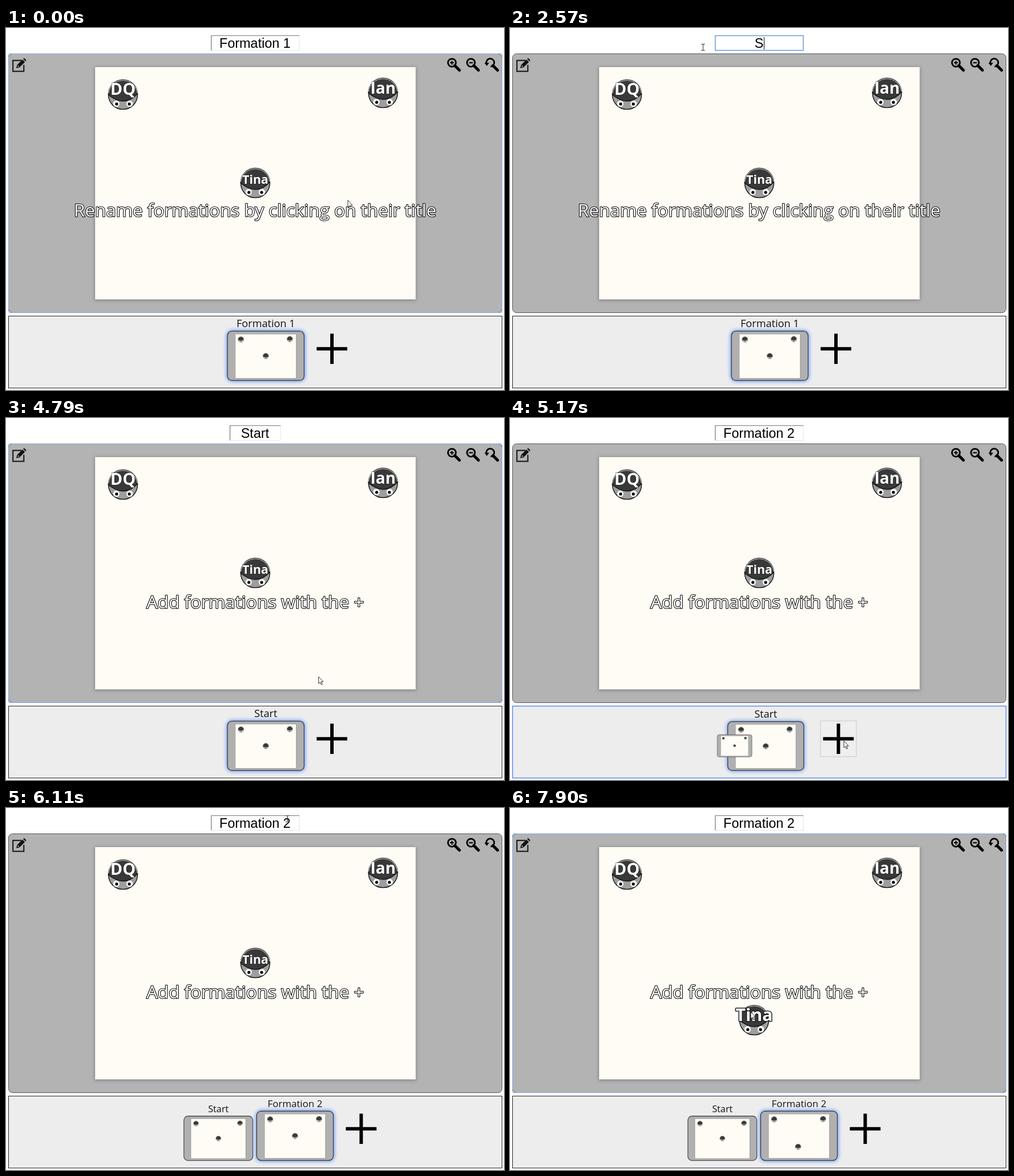
Write an HTML page that moves like this. It is 877x639 px and loops after 8000 ms.

```html
<!DOCTYPE html>
<html lang="en">
<head>
<meta charset="utf-8">
<title>Formations</title>
<style>
  html, body { margin: 0; width: 100%; height: 100%; overflow: hidden; background: #fff; }
  svg { display: block; width: 877px; height: 639px; }
  text { text-anchor: middle; font-family: "Open Sans", "Noto Sans", sans-serif; white-space: pre; }
  #title { font: 23.5px "Liberation Sans", Arial, sans-serif; }
  #caption { font-size: 31.6px; fill: #fff; stroke: #000; stroke-width: 2.1; stroke-linejoin: round; paint-order: stroke; }
  .name { font-weight: 700; fill: #fff; stroke: #222; stroke-linejoin: round; paint-order: stroke; }
  .paper { fill: #fffcf5; }
  .label { fill: #111; }
</style>
</head>
<body>
<svg viewBox="0 0 877 639">
  <defs>
    <filter id="soft" x="-20%" y="-20%" width="140%" height="140%"><feGaussianBlur stdDeviation="3"/></filter>
    <g id="face">
      <circle r="25.6" fill="#9e9e9e" stroke="#1c1c1c" stroke-width="1.5"/>
      <path d="M-25.6 0A25.6 25.6 0 0 1 25.6 -2Q3 23 -25.6 0z" fill="#393939" stroke="#111" stroke-width="1.4"/>
      <path d="M-25.6 -3A25.8 25.8 0 0 1 25.6 -3" fill="none" stroke="#bdbdbd" stroke-width="1.3"/>
      <g fill="#fff"><circle cx="-11.7" cy="15.7" r="5.6"/><circle cx="11.7" cy="15.7" r="5.6"/></g>
      <circle cx="-11.2" cy="16.2" r="2.6"/><circle cx="11.2" cy="16.2" r="2.6"/>
    </g>
    <path id="handle" d="M5 5L13.2 13.2" stroke="#000" stroke-width="5" stroke-linecap="round"/>
  </defs>

  <rect id="field" y="13.5" height="26" fill="#fff"/>
  <path id="bevel" fill="none" stroke="#777" stroke-width="1.2"/>
  <rect id="mark" y="15" height="24" fill="#3390ff"/>
  <text id="title" x="438.5" y="35"></text>
  <path id="caret" stroke="#000"/>

  <rect x="4.5" y="45.5" width="869" height="457" rx="7" fill="#b3b3b3" stroke="#555"/>
  <rect id="ring" x="4.5" y="45.5" width="869" height="457" rx="1" fill="none" stroke="#82aae6"/>
  <rect x="156" y="69" width="566.5" height="412" fill="#707070" opacity=".65" filter="url(#soft)"/>
  <rect class="paper" x="157" y="69" width="564.5" height="410"/>

  <g id="icons">
    <path d="M27 57.2H12.2V76.4H31.4V65" fill="none" stroke="#111" stroke-width="2"/>
    <path d="M18 71l1.7-6L29 55.7l4.3 4.3L24 69.3z M30.2 54.5l1.7-1.6 4 4-1.6 1.8z" fill="#111"/>
    <path d="M20.5 68.5l.8-2.6 1.8 1.8z" fill="#fff"/>
    <g fill="none" stroke="#000">
      <g transform="translate(785.3 61.3)"><use href="#handle"/><circle r="7" stroke-width="2.8"/><path d="M-3.4 0H3.4M0 -3.4V3.4" stroke-width="2"/></g>
      <g transform="translate(818.8 61.3)"><use href="#handle"/><circle r="7" stroke-width="2.8"/><path d="M-3.4 0H3.4" stroke-width="2.2"/></g>
      <g transform="translate(852.5 61.3)"><use href="#handle"/><path d="M-6.6 1A7 7 0 1 1 1 6.8" stroke-width="2.8"/><path d="M-10 0H-1.6L-5.8 5.6z" fill="#000" stroke="none"/></g>
    </g>
  </g>
  <g id="dancers"></g>

  <rect id="panel" x="4.5" y="508.5" width="869" height="127" fill="#ededed"/>
  <g id="plus">
    <rect id="key" x="-31.5" y="-31.5" width="63" height="63" fill="#efefef" stroke="#d5d5d5" stroke-width="1.5"/>
    <path d="M-27 0H27M0 -26.7V26.7" stroke="#000" stroke-width="6"/>
  </g>
  <g id="thumbs"></g>

  <path id="arrow" d="M0 0V12L2.7 9.5 4.6 14 6.5 13.2 4.6 8.8H8.2z" fill="#fff" stroke="#333" stroke-width="1"/>
  <path id="beam" d="M-3 -5.5H-1L0 -5 1 -5.5H3M0 -5V5M-3 5.5H-1L0 5 1 5.5H3" fill="none" stroke="#222" stroke-width="1"/>
  <text id="caption" x="438.8"></text>
</svg>
<script>
const LOOP = 8000, ADD = 5100, GROW = 760, GRAB = 7340, DROP = 7900;
const $ = id => document.getElementById(id);
const set = (el, attrs) => { for (const k in attrs) el.setAttribute(k, attrs[k]); };
const show = (el, on) => set(el, { visibility: on ? "visible" : "hidden" });
const mix = (a, b, p) => a + (b - a) * p;
const clamp = v => Math.min(1, Math.max(0, v));

// Latest entry whose time has come
const at = (list, t) => list.filter(e => e[0] <= t).pop()[1];

const titles = [[0, "Formation 1"], [2570, "S"], [2880, "St"], [2950, "Sta"], [3030, "Star"], [3270, "Start"], [ADD, "Formation 2"]];
const labels = [[0, "Formation 1"], [2730, "S"], [2950, "St"], [3110, "Star"], [3420, "Start"]];
const widths = [[0, 155], [2730, 89], [ADD, 155]];

// Pointer keys: time, x, y
const route = [
  [0, 602, 304], [40, 602, 304], [640, 507, 31], [1860, 507, 31], [2110, 340, 34],
  [3700, 340, 34], [3810, 524, 228], [4340, 524, 228], [4620, 545, 440], [4760, 545, 440],
  [5000, 588, 570], [5200, 588, 570], [5560, 537, 127], [5800, 500, 16], [6420, 491, 22],
  [6840, 491, 22], [7050, 446, 236], [7270, 446, 236], [7280, 434, 253], [GRAB, 434, 253],
  [7750, 424, 360], [LOOP, 424, 360]
];

function pointer(t) {
  const i = route.findIndex(k => k[0] > t);
  const a = route[i - 1], b = route[i];
  const p = (t - a[0]) / (b[0] - a[0]);
  return [mix(a[1], b[1], p), mix(a[2], b[2], p)];
}

// Standard "ease" curve, solved by bisection
function ease(x) {
  const bez = (a, b, u) => 3 * a * u * (1 - u) ** 2 + 3 * b * u * u * (1 - u) + u ** 3;
  let lo = 0, hi = 1;
  for (let i = 0; i < 20; i++) {
    const mid = (lo + hi) / 2;
    if (bez(.25, .25, mid) < x) lo = mid; else hi = mid;
  }
  return bez(.1, 1, lo);
}

const cast = [
  { name: "DQ", x: 206, y: 118, size: 29, base: 0 },
  { name: "Ian", x: 664, y: 115, size: 28, base: .5 },
  { name: "Tina", x: 439, y: 274, size: 21.5, base: .5 }
];
const lead = cast[2];

$("dancers").innerHTML = cast.map(d =>
  `<g transform="translate(${d.x} ${d.y})"><use href="#face"/>
   <text class="name" y="${d.base}" font-size="${d.size}" stroke-width="1">${d.name}</text></g>`).join("");
const leadEl = $("dancers").lastElementChild;
const leadName = leadEl.querySelector("text");

// Thumbnail drawn around its own centre
const mini = d => `translate(${(d.x - 439) * .188} ${(d.y - 274) * .188 + .6}) scale(.188)`;
const thumb = () => `<g><text class="label"></text><g class="card">
  <rect class="glow" x="-69.5" y="-45.5" width="139" height="91" rx="10" fill="#6a9cff" filter="url(#soft)"/>
  <rect x="-67.5" y="-43.5" width="135" height="87" rx="8" fill="#b0b0b0" stroke="#333" stroke-width="1.2"/>
  <rect x="-53.8" y="-38" width="108" height="78" fill="#999"/>
  <rect class="paper" x="-53.3" y="-38" width="106.5" height="77.3"/>
  ${cast.map(d => `<use href="#face" transform="${mini(d)}"/>`).join("")}</g></g>`;
$("thumbs").innerHTML = thumb() + thumb();
const [first, second] = $("thumbs").children;

function place(el, x, y, scale, glow, text, size) {
  set(el.querySelector(".card"), { transform: `translate(${x} ${y}) scale(${scale})` });
  set(el.querySelector(".glow"), { opacity: glow });
  const label = el.querySelector("text");
  label.textContent = text;
  set(label, { x, y: y - 43.5 * scale - 7.3, "font-size": size });
}

function drawTitle(t, mx) {
  const w = at(widths, t), l = 439 - w / 2, r = l + w;
  const focus = t >= 1270 && t < 3740;
  const text = at(titles, t);
  $("title").textContent = text;
  set($("field"), { x: l, width: w, stroke: focus ? "#6f9be3" : "#e6e6e6", "stroke-width": focus ? 1.6 : 1 });
  set($("bevel"), { d: `M${l} 39.5V13.5H${r}` });
  show($("bevel"), !focus);

  const picking = t >= 1660 && t < 2570;
  const from = t < 1880 ? 488 : Math.max(376, Math.min(488, mx));
  set($("mark"), { x: from, width: 501 - from });
  show($("mark"), picking);
  const end = 438.5 + $("title").getComputedTextLength() / 2 + 1;
  set($("caret"), { d: `M${Math.round(end) + .5} 16V38` });
  show($("caret"), focus && !picking);
}

function drawLead(t, mx, my) {
  const moved = t >= GRAB;
  const pos = t >= DROP ? { x: 430, y: 375 } : moved ? { x: mx + 5, y: my + 21 } : lead;
  set(leadEl, { transform: `translate(${pos.x} ${pos.y})` });
  const hover = t >= 7280;
  set(leadName, { "font-size": hover ? 30.5 : lead.size, "stroke-width": hover ? 3 : 1 });
  set(second.querySelector("use:last-child"), { transform: mini(t >= DROP ? pos : lead) });
  show($("icons"), !moved || t >= DROP);
}

function drawPanel(t, mx, my) {
  const p = ease(clamp((t - ADD) / GROW));
  const s = mix(1, .9, p);
  place(first, mix(457.5, 374, p), 622.2 - 43.5 * s, s, 1 - p, at(labels, t), mix(18.2, 16.3, p));
  place(second, mix(385, 509, p), 578.6, mix(.4, 1, p), p, "Formation 2", 17 * p ** 1.7);
  set(second, { display: t >= ADD ? "inline" : "none" });

  const px = mix(574, 625.5, p);
  set($("plus"), { transform: `translate(${px} 566.2)` });
  show($("key"), Math.abs(mx - px) < 32 && Math.abs(my - 566) < 32);
  const hover = my > 508;
  set($("panel"), { stroke: hover ? "#5b86ee" : "#222", "stroke-width": hover ? 1.5 : 1 });
}

function draw(t) {
  const [mx, my] = pointer(t);
  drawTitle(t, mx);
  drawLead(t, mx, my);
  drawPanel(t, mx, my);
  show($("ring"), my > 45 && my < 503);

  const late = t >= 4390;
  $("caption").textContent = late ? "Add formations with the +" : "Rename formations by clicking on their title";
  set($("caption"), { y: late ? 336 : 333 });

  const typing = my < 41;
  for (const id of ["arrow", "beam"]) {
    set($(id), { transform: `translate(${mx} ${my})` });
    show($(id), (id === "beam") === typing);
  }
}

function tick() {
  draw(performance.now() % LOOP);
  requestAnimationFrame(tick);
}
tick();
</script>
</body>
</html>
```
